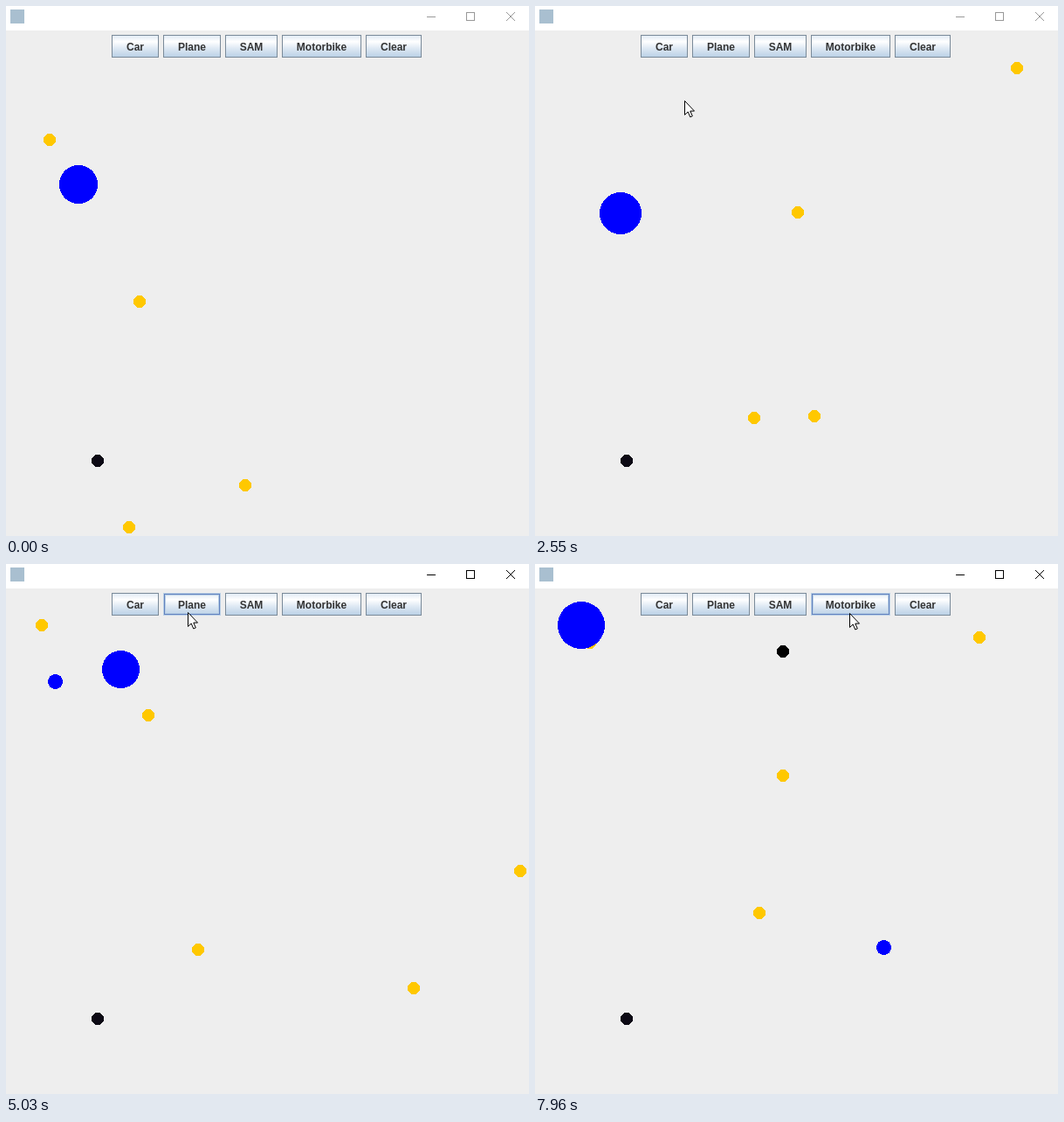
These frames come from a looping animation (599 by 606 pixels, 8 s). An HTML page with a canvas:

```html
<!DOCTYPE html>
<html>
<head>
<meta charset="utf-8">
<style>
  html, body { margin: 0; width: 100%; height: 100%; overflow: hidden; background: #eee; }
  canvas { display: block; }
</style>
</head>
<body>
<canvas id="stage" width="599" height="606"></canvas>
<script>
const ctx = document.getElementById('stage').getContext('2d');
const LOOP = 8000, TITLE_H = 28, WIDTH = 599, HEIGHT = 606;
const EDGE = 7, PANEL_H = HEIGHT - TITLE_H;
const ACTIVE_AT = 3430, SAM_AT = 6700;
const BUTTON_Y = 33, BUTTON_H = 26, BUTTON_GAP = 5;

// Every path has one stop per key time, as [x, y, radius?] in unwrapped
// coordinates; null means no turn at that time.
const KEYS = [0, 760, 1780, 3260, 4320, 5030, 6390, 7340, 7960];
const cars = [
  { path: [[50, 153], [35, 149], [-56, 147], [-36, -13], [46, 19], [41, 70], [-40, 0], [-36, 1], [-90, 84]] },
  { path: [[153, 338], null, [245, 514], [404, 418], [508, 380], [589, 351], [721, 301], null, [883, 242]] },
  { path: [[274, 548], [253, 500], [242, 476], [262, 465], [230, 418], [220, 441], [253, 461], null, [257, 399]] },
  { path: [[141, 596], [190, 647], [254, 743], [353, 892], [417, 988], [467, 1063], [558, 1174], [634, 1192], [662, 1246]] },
  { from: 3500, path: [null, null, null, [205, 98], [186, 142], [163, 173], [110, 58], null, [48, 72]] }
];
const planes = [
  { path: [[82.5, 203.5, 22], null, [137.5, 286.5, 22], [53, 182, 26], [76.5, 115.5, 24],
    [131, 120, 21.5], [127, 204, 22], null, [52.5, 69.5, 27]] },
  { from: 4950, path: [null, null, null, null, [64, 90, 8.5], [56, 134, 8.5], [-51, 348, 19], null, [-200, 438, 8.5]] }
];
const pointer = {
  from: 760,
  path: [null, [330, 800], [260, 269], [140, 50], [186, 63], [209, 55], [292, 66], [361, 56]]
};
const buttonWidths = { Car: 54, Plane: 66, SAM: 60, Motorbike: 91, Clear: 64 };
const arrow = new Path2D('M0 0V16L3.7 12.5L6.3 18.5L8.8 17.4L6.3 11.6H11Z');

const linear = k => k;
const settle = k => {
  const s = Math.min(1, k * 1.4);
  return s * s * (3 - 2 * s);
};

function locate({ path, from = 0 }, t, ease = linear) {
  if (t < from) return null;
  let a = -1, b = -1;
  path.forEach((stop, i) => {
    if (stop && KEYS[i] <= t) a = i;
    if (stop && KEYS[i] > t && b < 0) b = i;
  });
  if (b < 0) return path[a];
  const k = ease((t - KEYS[a]) / (KEYS[b] - KEYS[a]));
  return path[a].map((v, i) => v + (path[b][i] - v) * k);
}

// The picture repaints in steps: slowly at first, then about every 78 ms.
function repaintTime(t) {
  const i = KEYS.findLastIndex(key => key <= t);
  if (i === KEYS.length - 1) return KEYS[i];
  const span = KEYS[i + 1] - KEYS[i];
  const step = span / Math.round(span / (i ? 78 : 152));
  return KEYS[i] + Math.floor((t - KEYS[i]) / step) * step;
}

const wrap = (v, low, span) => ((v - low) % span + span) % span + low;

// Filled circle with hard pixel edges.
function disc(x, y, r, color) {
  const size = Math.round(2 * r), left = Math.round(x - r), top = Math.round(y - r);
  const radius = size / 2;
  ctx.fillStyle = color;
  for (let row = 0; row < size; row++) {
    const dy = row + 0.5 - radius;
    const inset = Math.round(radius - Math.sqrt(radius * radius - dy * dy));
    ctx.fillRect(left + inset, top + row, size - 2 * inset, 1);
  }
}

function drawMover(mover, t, color) {
  const p = locate(mover, t);
  if (p) disc(wrap(p[0], EDGE, WIDTH), wrap(p[1], TITLE_H + EDGE, PANEL_H), p[2] || 7, color);
}

function frame(x, y, w, h, color) {
  ctx.strokeStyle = color;
  ctx.lineWidth = 1;
  ctx.strokeRect(x + 0.5, y + 0.5, w - 1, h - 1);
}

function drawButton(label, x, w, tip) {
  const y = BUTTON_Y, h = BUTTON_H;
  const shade = ctx.createLinearGradient(0, y, 0, y + h);
  shade.addColorStop(0, '#dde8f3');
  shade.addColorStop(0.3, '#fff');
  shade.addColorStop(0.6, '#dde8f3');
  shade.addColorStop(1, '#b8cfe5');
  ctx.fillStyle = shade;
  ctx.fillRect(x, y, w, h);
  const hover = tip && tip[0] >= x && tip[0] < x + w && tip[1] >= y && tip[1] < y + h;
  if (hover) {
    frame(x, y, w, h, '#b8cfe5');
    frame(x + 1, y + 1, w - 2, h - 2, '#6382bf');
    frame(x + 2, y + 2, w - 4, h - 4, '#b8cfe5');
  } else {
    frame(x, y, w, h, '#7a8a99');
  }
  ctx.fillStyle = '#333';
  ctx.font = 'bold 12px "Liberation Sans", Arial, sans-serif';
  ctx.textAlign = 'center';
  ctx.fillText(label, x + w / 2, 51);
}

function drawButtons(tip) {
  let x = 121;
  for (const [label, w] of Object.entries(buttonWidths)) {
    drawButton(label, x, w, tip);
    x += w + BUTTON_GAP;
  }
}

function drawTitleBar(active) {
  ctx.fillStyle = '#fff';
  ctx.fillRect(0, 0, WIDTH, TITLE_H);
  ctx.fillStyle = '#a9bfd0';
  ctx.fillRect(5, 4, 16, 16);
  const ink = active ? '#000' : '#999';
  ctx.fillStyle = ink;
  ctx.fillRect(482, 12, 10, 1);
  frame(527, 7, 10, 10, ink);
  ctx.beginPath();
  ctx.moveTo(573, 7);
  ctx.lineTo(583, 17);
  ctx.moveTo(583, 7);
  ctx.lineTo(573, 17);
  ctx.stroke();
}

function drawPointer([x, y]) {
  ctx.save();
  ctx.translate(Math.round(x) - 0.5, Math.round(y) + 0.5);
  ctx.fillStyle = '#fff';
  ctx.strokeStyle = '#000';
  ctx.lineWidth = 1;
  ctx.fill(arrow);
  ctx.stroke(arrow);
  ctx.restore();
}

function draw(t) {
  ctx.fillStyle = '#eee';
  ctx.fillRect(0, 0, WIDTH, HEIGHT);
  for (const car of cars) drawMover(car, t, '#ffc800');
  disc(105, 520, 7, '#0c0914');
  if (t >= SAM_AT) disc(284, 100, 7, '#000');
  for (const plane of planes) drawMover(plane, t, '#00f');
  const tip = locate(pointer, t, settle);
  drawButtons(tip);
  drawTitleBar(t >= ACTIVE_AT);
  if (tip) drawPointer(tip);
}

let start = null;
function tick(now) {
  if (start === null) start = now;
  draw(repaintTime((now - start) % LOOP));
  requestAnimationFrame(tick);
}
requestAnimationFrame(tick);
</script>
</body>
</html>
```
